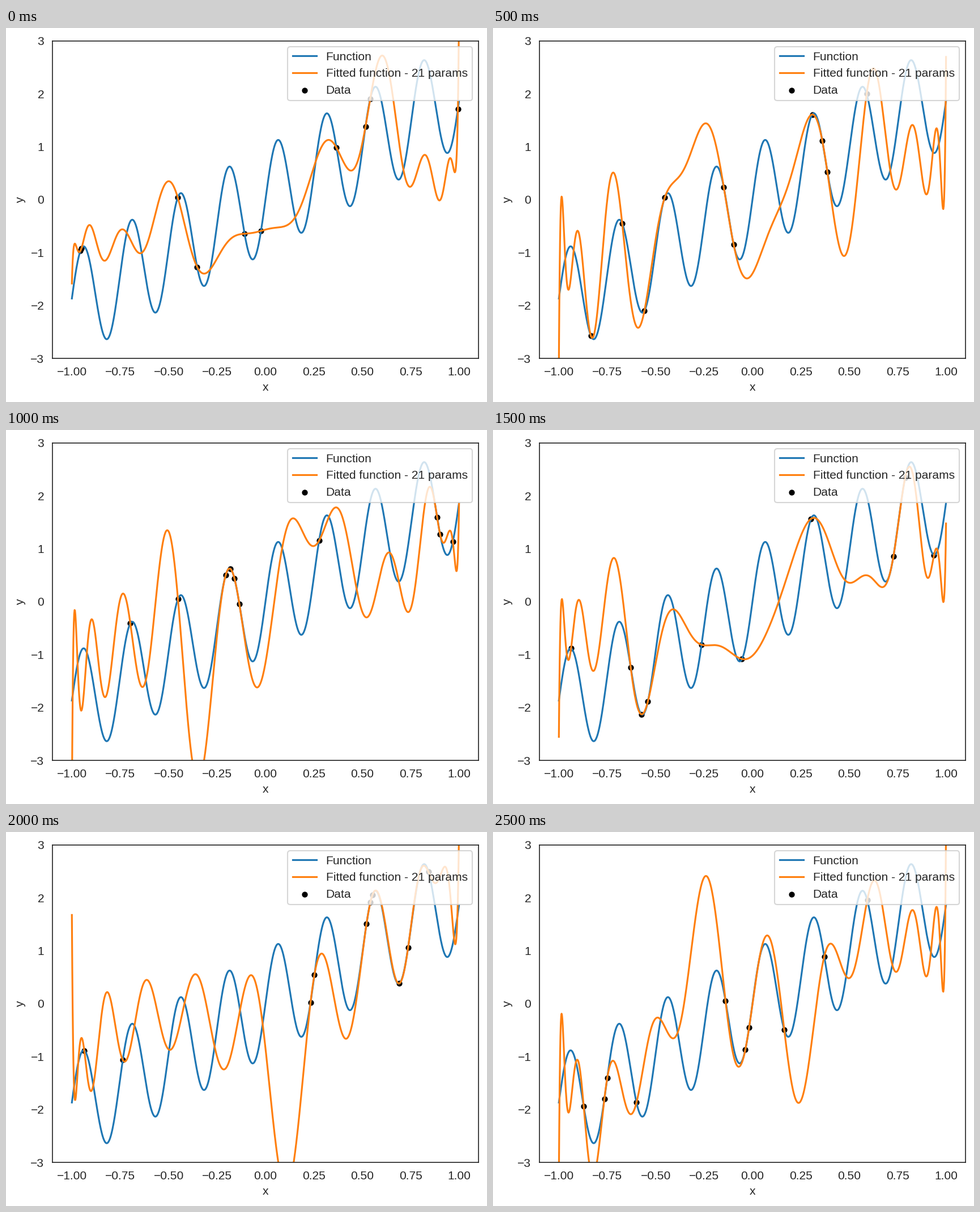
A matplotlib script that plays this animation: 849 by 660 pixels, repeating every 3 s.

```python
import matplotlib.pyplot as plt
import numpy as np
from matplotlib.animation import FuncAnimation
from numpy.polynomial.legendre import legvander

W, H, DPI = 849, 660, 151.6
LEFT, RIGHT, TOP, BOTTOM = 82.1, 833.8, 22.8, 583.1  # axes box in pixels
PARAMS = 21
INK = "0.15"

# key points: sampled x in thousandths, one random draw per row
DRAWS = np.array([
    (-956, -951, -453, -353, -108, -23, 367, 517, 541, 994),
    (-835, -673, -558, -453, -148, -97, 309, 361, 387, 590),
    (-698, -452, -205, -181, -160, -135, 277, 887, 902, 968),
    (-937, -629, -573, -540, -263, -54, 303, 728, 789, 938),
    (-936, -737, 233, 253, 522, 542, 553, 691, 737, 842),
    (-872, -765, -750, -599, -139, -37, -17, 164, 371, 593),
]) / 1000

plt.rcParams.update({
    "font.family": "Liberation Sans",
    "font.size": 10,
    "text.color": INK,
    "axes.labelcolor": INK,
    "axes.edgecolor": INK,
    "xtick.color": INK,
    "ytick.color": INK,
    "xtick.bottom": False,
    "ytick.left": False,
})


def func(x):
    return 2 * x + np.sin(25 * x)


def features(x):
    """Legendre polynomials of degree 1 to PARAMS, without a constant."""
    return legvander(x, PARAMS)[:, 1:]


def fit(x, y, grid):
    """Minimum-norm least squares, evaluated on the grid."""
    return features(grid) @ np.linalg.pinv(features(x)) @ y


# the tiny margin guards against the pixel size rounding down
fig = plt.figure(figsize=((W + 1e-6) / DPI, (H + 1e-6) / DPI), dpi=DPI,
                 facecolor="white")
ax = fig.add_axes([LEFT / W, 1 - BOTTOM / H, (RIGHT - LEFT) / W, (BOTTOM - TOP) / H])

grid = np.linspace(-1, 1, 1000)
ax.plot(grid, func(grid), color="#1f77b4", label="Function")
fitted, = ax.plot(grid, func(grid), color="#ff7f0e",
                  label=f"Fitted function - {PARAMS} params")
dots = ax.scatter(DRAWS[0], func(DRAWS[0]), s=15, color="black", label="Data")

ax.set(xlim=(-1.1, 1.1), ylim=(-3, 3), xlabel="x", ylabel="y")
ax.set_xticks(np.linspace(-1, 1, 9))
ax.set_yticks(range(-3, 4))
ax.legend(loc="upper right")


def update(i):
    x = DRAWS[i]
    y = func(x)
    fitted.set_ydata(fit(x, y, grid))
    dots.set_offsets(np.column_stack([x, y]))
    return fitted, dots


anim = FuncAnimation(fig, update, frames=len(DRAWS), interval=500,
                     repeat=True, repeat_delay=0, blit=False)
plt.show()
```
